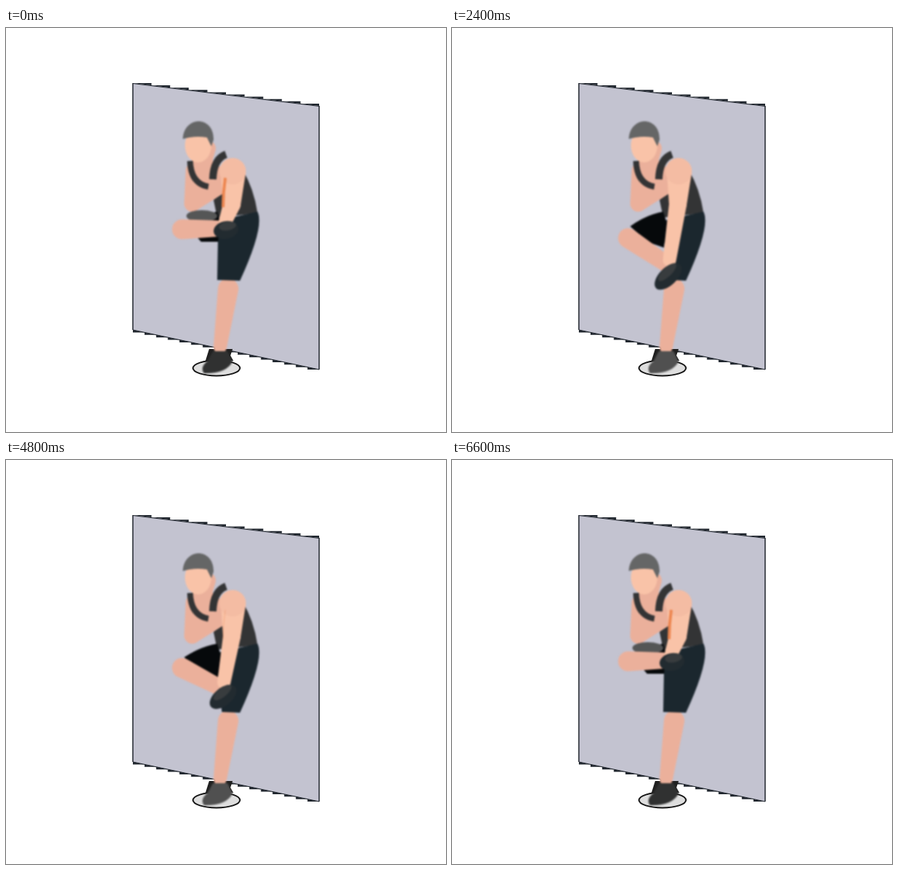
Recreate the animation shown at these times as an HTML page. Size 600 by 550 pixels, loop 7.2 s.

```html
<!DOCTYPE html>
<html lang="en">
<head>
<meta charset="utf-8">
<title>Standing leg stretch</title>
<style>
html, body { margin: 0; width: 100%; height: 100%; overflow: hidden; background: #fff; }
svg { display: block; width: 600px; height: 550px; }
#figure { filter: blur(0.8px); }
</style>
</head>
<body>
<svg viewBox="0 0 600 550">
  <g id="panel"></g>
  <g id="ground"></g>
  <g id="figure"></g>
</svg>
<script>
const STEP = 600, SLOTS = 12;
const SKIN = '#ebb09b', LIGHT = '#f9c3a8', SHOULDER = '#f4bca3';
const CLOTH = '#333435', SHORTS = '#1b272e', HAIR = '#656666', EDGE = '#20262e';
const layer = id => document.getElementById(id);

const shape = (fill, d) => `<path fill="${fill}" d="${d}"/>`;
const line = (color, width, d) =>
  `<path fill="none" stroke="${color}" stroke-width="${width}" d="${d}"/>`;
const oval = (fill, x, y, rx, ry, extra = '') =>
  `<ellipse fill="${fill}" cx="${x}" cy="${y}" rx="${rx}" ry="${ry}" ${extra}/>`;

// Tapered capsule: two circles joined by their outer tangents.
function limb(fill, [ax, ay], ra, [bx, by], rb) {
  const angle = Math.atan2(by - ay, bx - ax);
  const spread = Math.acos((ra - rb) / Math.hypot(bx - ax, by - ay));
  const rim = (x, y, r, side) =>
    [x + r * Math.cos(angle + side * spread), y + r * Math.sin(angle + side * spread)];
  const wide = spread < Math.PI / 2 ? 1 : 0;
  return shape(fill, `M${rim(ax, ay, ra, 1)}A${ra} ${ra} 0 ${wide} 1 ${rim(ax, ay, ra, -1)}
    L${rim(bx, by, rb, -1)}A${rb} ${rb} 0 ${1 - wide} 1 ${rim(bx, by, rb, 1)}Z`);
}

// Small wedges turn a sloping edge into a staircase.
function stairs(y, drop, count, below) {
  const run = 254 / count, rise = drop / count;
  let d = '';
  for (let i = 0; i < count; i++) {
    const corner = below ? `v${rise}h${run}` : `h${run}v${rise}`;
    d += `M${173 + i * run} ${y + i * rise}${corner}Z`;
  }
  return shape(EDGE, d);
}

function drawPanel() {
  return shape('#c3c3d0', 'M173 75 427 106V465L173 411Z') +
    line(EDGE, 1.5, 'M173 75V411M427 106V465') +
    line(EDGE, 1, 'M173 75.5 427 106.5M173 411 427 465') +
    stairs(75, 31, 10, false) + stairs(411, 54, 16, true);
}

function drawGround(pose) {
  const reach = pose === 5 ? 35 : 33;
  return oval('#dedede', 320 - reach, 463, reach - 1, 10.5, 'stroke="#151515" stroke-width="2"') +
    shape('#202020', 'M277 437H309L306 446 310 453H272Z');
}

function drawTorso() {
  return shape(CLOTH, 'M322 192Q338 218 343 252L288 258 283 234 300 220Z');
}

function drawChest() {
  const elbow = [254, 239];
  return limb(SKIN, [256, 194], 11, elbow, 11) +
    limb(SKIN, elbow, 11, [288, 214], 14) +
    limb(SKIN, [268, 190], 16, [282, 203], 17) +
    line(CLOTH, 8, 'M251 181Q252 212 276 216');
}

function drawHead() {
  return limb(SKIN, [275, 164], 11, [272, 178], 10) +
    oval(LIGHT, 262, 160, 18, 23) +
    shape(HAIR, 'M241 151C243 118 284 120 283 152L280 161 274 149Q258 146 241 151Z');
}

function drawRaisedLeg(pose) {
  const knee = [240, 274 + 3 * pose];
  const ankle = [288 + 1.6 * pose, 273 + 12.4 * pose];
  const thigh = `M243 ${264 + 1.5 * pose}Q265 254 288 250L293 266 289 ${291 + 2 * pose} 266 291Z`;
  return shape('#06090b', thigh) +
    (pose ? '' : oval('#555656', 267, 256, 21, 8)) +
    limb(SKIN, knee, 13.5, ankle, 11);
}

function drawNearArm(pose) {
  const elbow = [308, 240], wrist = [299 - 0.6 * pose, 264 + 13 * pose];
  return line(CLOTH, 10, 'M300 172Q283 178 282 206') +
    limb(LIGHT, [310, 195], 17, elbow, 12) +
    limb(LIGHT, elbow, 12, wrist, 9) +
    oval(SHOULDER, 309, 195, 18, 18) +
    line('#ed8650', Math.max(0, 4 - 1.2 * pose), 'M299 204Q296 224 296 244');
}

function drawRaisedShoe(pose) {
  const tilt = -10 - 38 * Math.sqrt(pose / 5);
  const length = 17 + 1.5 * pose;
  return `<g transform="translate(${300 - 1.3 * pose} ${275 + 15.8 * pose}) rotate(${tilt})">` +
    oval('#222b30', 0, 0, length, 12) + oval('#383c3e', 3, -5, length * 0.7, 6) + '</g>';
}

function drawFigure(pose) {
  const hem = 288 + 0.7 * pose * pose;
  return limb(SKIN, [303, 355], 14, [292, 434], 9) +
    shape(pose ? '#505050' : '#303131',
      'M282 440H302L309 454Q300 471 270 470 264 462 275 453Z') +
    drawTorso() +
    shape(SHORTS, `M290 262 343 250Q353 270 319 344L${hem} 343 289 288Z`) +
    drawChest() + drawHead() + drawRaisedLeg(pose) + drawNearArm(pose) + drawRaisedShoe(pose);
}

let shown = -1;
function tick() {
  const slot = Math.floor(performance.now() / STEP) % SLOTS;
  const pose = Math.min(slot, SLOTS - 1 - slot);
  if (pose !== shown) {
    shown = pose;
    layer('ground').innerHTML = drawGround(pose);
    layer('figure').innerHTML = drawFigure(pose);
  }
  requestAnimationFrame(tick);
}

layer('panel').innerHTML = drawPanel();
tick();
</script>
</body>
</html>
```
